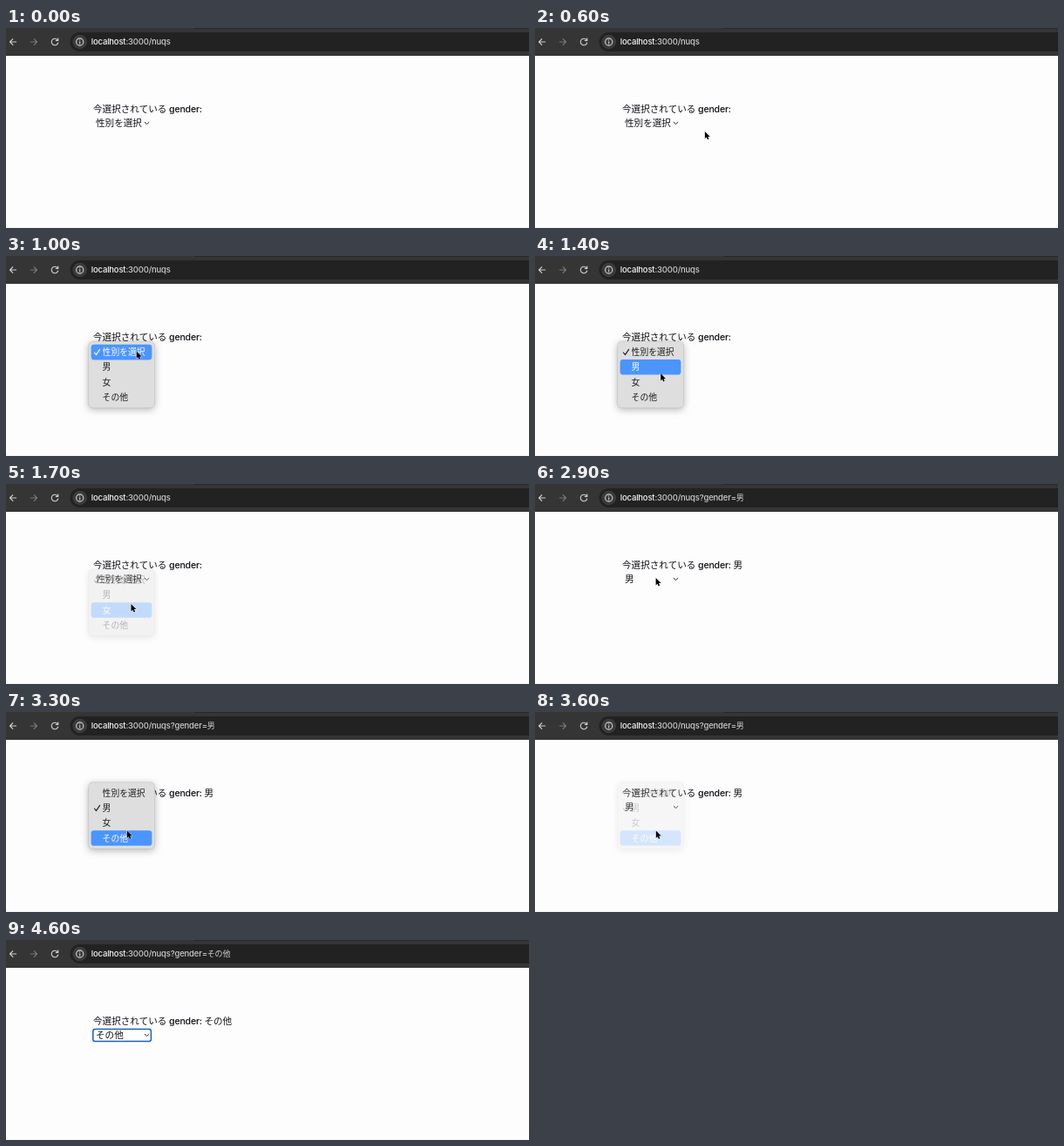
An HTML page that plays this animation: 600 px wide and 230 px high, repeating every 4.8 s.

```html
<!DOCTYPE html>
<html lang="ja">
<head>
<meta charset="utf-8">
<title>Select demo</title>
<style>
  html, body { margin: 0; width: 100%; height: 100%; overflow: hidden; background: #fdfdfd; }
  svg { display: block; width: 600px; height: 230px; }
  text { font-family: Inter, "Noto Sans CJK JP", "Noto Sans CJK", sans-serif; white-space: pre; }
  .url { font-size: 9.5px; font-weight: 450; letter-spacing: -.02em; fill: #cdcdcd; }
  .host { fill: #f4f4f4; }
  .page { font-size: 10.6px; fill: #0e0e16; }
  .latin { font-weight: 500; letter-spacing: -.02em; }
  .item { font-size: 9.8px; fill: #1c1c1c; }
  .icon { fill: none; stroke: #cfcfcf; stroke-width: 1.1; stroke-linecap: round; stroke-linejoin: round; }
  .panel { fill: #dedede; stroke: #00000026; stroke-width: .6; filter: drop-shadow(0 2px 4px #00000047); }
  .on { fill: #fff; }
</style>
</head>
<body>
<svg viewBox="0 0 600 230">
  <rect width="600" height="230" fill="#fdfdfd"/>
  <rect y="229" width="600" height="1" fill="#f3f3f3"/>

  <!-- browser bar -->
  <rect width="600" height="32" fill="#353535"/>
  <rect x="216" width="384" height="1" fill="#292929"/>
  <rect x="73.5" y="5" width="560" height="22" rx="11" fill="#222"/>
  <g class="icon">
    <path d="M11.6 16H4.6M7.8 12.7L4.5 16L7.8 19.3"/>
    <path d="M28.4 16H35.4M32.2 12.7L35.5 16L32.2 19.3" stroke="#7b7b7b"/>
    <path d="M59.2 13.9A3.8 3.8 0 1 0 59.7 17M59.8 11.9V14.5H57.2"/>
  </g>
  <circle cx="84.7" cy="16" r="8.3" fill="#3b3b3b"/>
  <circle cx="84.7" cy="16" r="4.1" class="icon"/>
  <path d="M84.7 15.7V18M84.7 13.9V14" class="icon"/>
  <text class="url" x="97.8" y="19.4"><tspan class="host">localhost</tspan>:3000/nuqs<tspan id="query"></tspan><tspan id="param" font-size="9"></tspan></text>

  <!-- page -->
  <text class="page" x="100" y="97.3">今選択されている<tspan class="latin"> gender: </tspan><tspan id="shown"></tspan></text>
  <rect id="ring" x="99.8" y="102.4" width="66.6" height="14.2" rx="2.4" fill="#fff" stroke="#1462c1" stroke-width="1.5"/>
  <text class="page" id="chosen" x="103" y="113.2"></text>
  <path d="M159 108.1L161.6 110.6L164.2 108.1" fill="none" stroke="#222" stroke-width="1"/>

  <g id="menu">
    <rect class="panel" x="94.6" width="76" height="76.8" rx="5"/>
    <rect id="bar" x="97.6" width="69.8" height="17.6" rx="3.4" fill="#4a95ff"/>
    <path id="check" d="M-3 .4L-.9 3L3.2 -3.2" fill="none" stroke-width="1.1" stroke-linecap="round" stroke-linejoin="round"/>
  </g>

  <path id="cursor" d="M0 0V8.4L1.9 6.7L3.1 9.4L4.6 8.7L3.4 6.1H6Z" fill="#000" stroke="#fff" stroke-width="1" stroke-linejoin="round" paint-order="stroke"/>
</svg>
<script>
  const LOOP = 4800, TICK = 100, ROW = 17.2, PAD = 4;
  const LABELS = ['性別を選択', '男', '女', 'その他'];
  const $ = id => document.getElementById(id);
  const menu = $('menu'), cursor = $('cursor');

  // time, x, y of the pointer tip
  const PATH = [
    [100, 324, 145.5], [200, 324, 145.5], [800, 149.7, 109.6], [1000, 149.7, 109.6],
    [1500, 143.5, 138], [1700, 143.5, 138], [2100, 140.5, 138], [2400, 140.5, 138],
    [2900, 138.6, 108], [3000, 138.6, 108], [3300, 138.8, 136.5], [4200, 138.8, 136.5],
    [4500, 161, 49], [4600, 161, 49]
  ];

  // each opening: panel top, checked row, and the opacities of its fade
  const OPENINGS = [
    { from: 1000, close: 1600, fade: [.65, .32, .06], top: 98, checked: 0 },
    { from: 3000, close: 3500, fade: [.6, .22], top: 98 - ROW, checked: 1 }
  ];

  const items = LABELS.map((label, i) => {
    const el = document.createElementNS('http://www.w3.org/2000/svg', 'text');
    el.textContent = label;
    el.setAttribute('x', 110.6);
    el.setAttribute('y', PAD + ROW * (i + .5) + 3.6);
    menu.append(el);
    return el;
  });

  const ease = p => p * p * (3 - 2 * p);
  const show = (el, on) => el.style.display = on ? '' : 'none';
  const valueAt = (t, first, second) => t >= second ? 3 : t >= first ? 1 : 0;

  function pointer(t) {
    const i = PATH.findIndex(p => p[0] > t);
    if (i < 1) return null;
    const [t0, x0, y0] = PATH[i - 1], [t1, x1, y1] = PATH[i];
    const k = ease((t - t0) / (t1 - t0));
    return [x0 + (x1 - x0) * k, y0 + (y1 - y0) * k];
  }

  function drawMenu(t) {
    const open = OPENINGS.find(o => t >= o.from && t < o.close + o.fade.length * TICK);
    show(menu, open);
    if (!open) return;
    const { top, checked, close, fade } = open;
    // the highlight stays put once the menu is closing
    const y = pointer(Math.min(t, close))[1] + 1;
    const hover = Math.floor((y - top - PAD) / ROW);
    menu.setAttribute('transform', `translate(0 ${top})`);
    menu.setAttribute('opacity', t < close ? 1 : fade[(t - close) / TICK]);
    $('bar').setAttribute('y', PAD + ROW * hover - .2);
    items.forEach((el, i) => el.setAttribute('class', i === hover ? 'item on' : 'item'));
    $('check').setAttribute('transform', `translate(104.4 ${PAD + ROW * (checked + .5)})`);
    $('check').setAttribute('stroke', checked === hover ? '#fff' : '#1c1c1c');
  }

  function draw() {
    const t = Math.floor(performance.now() % LOOP / TICK) * TICK;
    const value = valueAt(t, 1800, 3700), param = valueAt(t, 1900, 3800);
    $('chosen').textContent = LABELS[value];
    $('shown').textContent = value ? LABELS[value] : '';
    $('query').textContent = param ? '?gender=' : '';
    $('param').textContent = param ? LABELS[param] : '';
    show($('ring'), t >= 3700);
    drawMenu(t);
    const at = pointer(t);
    show(cursor, at);
    if (at) cursor.setAttribute('transform', `translate(${at})`);
    requestAnimationFrame(draw);
  }
  draw();
</script>
</body>
</html>
```
